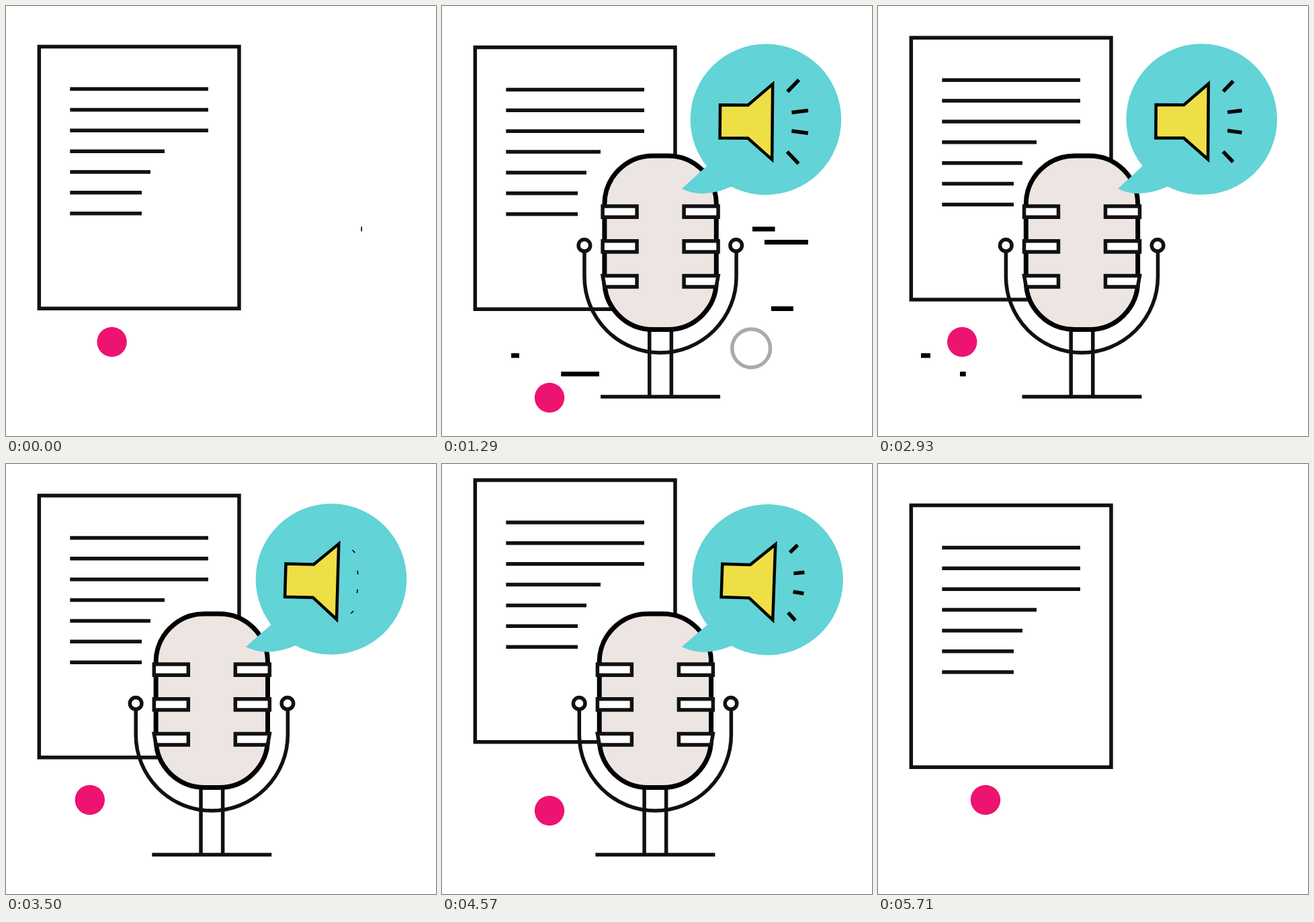
Recreate the animation shown at these times as an HTML page. Size 640x640 px, loop 5.78 s.

```html
<!DOCTYPE html>
<html lang="en">
<head>
<meta charset="utf-8">
<title>Voice recording</title>
<style>
  html, body { margin: 0; width: 100%; height: 100%; overflow: hidden; background: #fff; }
  svg { display: block; width: 100%; height: 100%; }
</style>
</head>
<body>
<svg viewBox="0 0 640 640" fill="none" stroke="#111" stroke-width="5.5">
  <g id="paper">
    <path d="M49.3 61.6H347V451.3H49.3Z"/>
    <path id="text"/>
  </g>
  <path id="dashes" stroke="#000" stroke-width="7"/>
  <circle id="ring" cx="460.2" cy="509.5" r="28.4" stroke="#000"/>
  <circle id="dot" cx="160" cy="500" r="22.2" fill="#ed1370" stroke="none"/>
  <g id="mic">
    <path d="M287.2 483V581.5M319.8 483V581.5M214.5 581.5H392.5"/>
    <path d="M190.4 365V403A113 113 0 0 0 416.5 403V365"/>
    <circle cx="190.3" cy="356.3" r="8.8" fill="#fff"/>
    <circle cx="416.1" cy="356.3" r="8.8" fill="#fff"/>
    <rect x="220.3" y="223" width="166.4" height="258.5" rx="72" fill="#ede5e2" stroke="#000" stroke-width="7"/>
    <path id="bands" fill="#fff"/>
  </g>
  <g id="bubble">
    <g fill="#62d3d6" stroke="none">
      <circle cx="481.5" cy="168.3" r="112.3"/>
      <path d="M395 237L357 272Q389 288 433 267.5Z"/>
    </g>
    <path d="M413.5 147H455L491.5 115.5L491 228L455 196.3H413.3Z" fill="#eedf46" stroke="#000" stroke-width="4.5"/>
    <path id="waves" stroke="#000"/>
  </g>
</svg>
<script>
const LOOP = 5780;
const HALF = LOOP / 2;
const HOP = 732;
const $ = id => document.getElementById(id);
const clamp = (x, low = 0, high = 1) => Math.min(high, Math.max(low, x));
const smooth = u => (1 - Math.cos(Math.PI * u)) / 2;

// Progress from 0 to 1 between two times
const ramp = (t, from, to) => clamp((t - from) / (to - from));

// Out and back once per period; a skew below 1 makes the start quicker than the return
const hop = (t, period, start, length, skew = 1) =>
  Math.sin(Math.PI * ramp(t % period, start, start + length) ** skew);
const quickHop = (t, period, start) => hop(t, period, start, HOP, .73);

// Grows in at the start of the loop and shrinks away at its end
const pop = (t, inEnd, outStart) => smooth(ramp(t, 0, inEnd)) - smooth(ramp(t, outStart, 5670));

// Interpolates keys of the form [time, value]
function track(t, keys, ease = u => u) {
  const next = keys.findIndex(([time]) => time > t);
  if (next === 0) return keys[0][1];
  if (next < 0) return keys[keys.length - 1][1];
  const [t0, v0] = keys[next - 1], [t1, v1] = keys[next];
  return v0 + (v1 - v0) * ease(ramp(t, t0, t1));
}

// The bubble swings between tilted and upright
const tilt = [640, 1150, 2000, 3050, 4150, 4950].map((time, i) => [time, i % 2 ? 0 : 3.85]);
const ringFade = [[220, 0], [640, .13], [1930, .53], [2500, 0]];

// Each dash slides left through a window that clips it; all share one motion
const slide = [[0, -.6], [640, 0], [1930, .16], [2930, .71], [3300, 1], [4700, 1], [4700, -.6], [5000, -.36], [5640, 1]];
const dashes = [
  { y: 332, left: 462, right: 530, length: 42, lead: .614 },
  { y: 351.5, left: 480, right: 580, length: 67, lead: .53 },
  { y: 450.5, left: 485, right: 525, length: 33, lead: .4 },
  { y: 547.7, left: 122, right: 234, length: 65, lead: .24 },
  { y: 520.2, left: 64, right: 115, length: 19, lead: .09 }
];

function dashPath({ y, left, right, length, lead }, progress) {
  const head = right - (right - left + length) * (lead + progress);
  const from = clamp(head, left, right), to = clamp(head + length, left, right);
  return to > from ? `M${from} ${y}H${to}` : '';
}

// Sound waves grow, fade and repeat; the last set stays
function drawWaves(t) {
  const period = 860, lastCycle = 4, since = t - 897;
  const cycle = Math.min(lastCycle, Math.floor(since / period));
  const phase = since - cycle * period;
  const grown = cycle < 0 ? 0 : ramp(phase, 0, 360);
  const rays = [-1, 1].map(side =>
    `M513.5 ${171.5 + 44.7 * side}l${17 * grown} ${17.7 * side * grown}` +
    `M520 ${171.5 + 13.7 * side}l${24.5 * grown} ${3.2 * side * grown}`);
  $('waves').setAttribute('d', grown ? rays.join('') : '');
  $('waves').setAttribute('opacity', cycle === lastCycle ? 1 : 1 - ramp(phase, 640, 800));
}

function draw(t) {
  const move = (id, value) => $(id).setAttribute('transform', value);

  move('paper', `translate(0 ${-38.3 * quickHop(t, HALF / 2, 0)})`);
  move('dot', `translate(${-93 * quickHop(t, HALF, 0) * (t < LOOP)} ${83 * quickHop(t, HALF, 1010)})`);

  const sway = 21.6 * hop(t, HALF, 550, 1455);
  move('mic', `translate(${303.5 + sway} 582) scale(${pop(t, 500, 5140)}) translate(-303.5 -582)`);

  move('bubble', `translate(357 272) rotate(${track(t, tilt, smooth)}) ` +
    `scale(${pop(t, 760, 4950)}) translate(-357 -272)`);

  $('ring').setAttribute('opacity', track(t, ringFade));
  const progress = track(t, slide);
  $('dashes').setAttribute('d', dashes.map(dash => dashPath(dash, progress)).join(''));
  drawWaves(t);
}

$('text').setAttribute('d', [301, 301, 301, 236, 215, 202, 202]
  .map((end, i) => `M95.3 ${124.5 + 30.87 * i}H${end}`).join(''));

$('bands').setAttribute('d', [0, 1, 2].map(i => {
  const top = 298 + 51.8 * i, bottom = top + 16.3, slant = i === 2 ? 3 : 0;
  return `M217.5 ${top}H268.5V${bottom}H${217.5 + slant}Z` +
         `M389.5 ${top}H338.5V${bottom}H${389.5 - slant}Z`;
}).join(''));

const began = performance.now();
function frame() {
  draw((performance.now() - began) % LOOP);
  requestAnimationFrame(frame);
}
frame();
</script>
</body>
</html>
```
